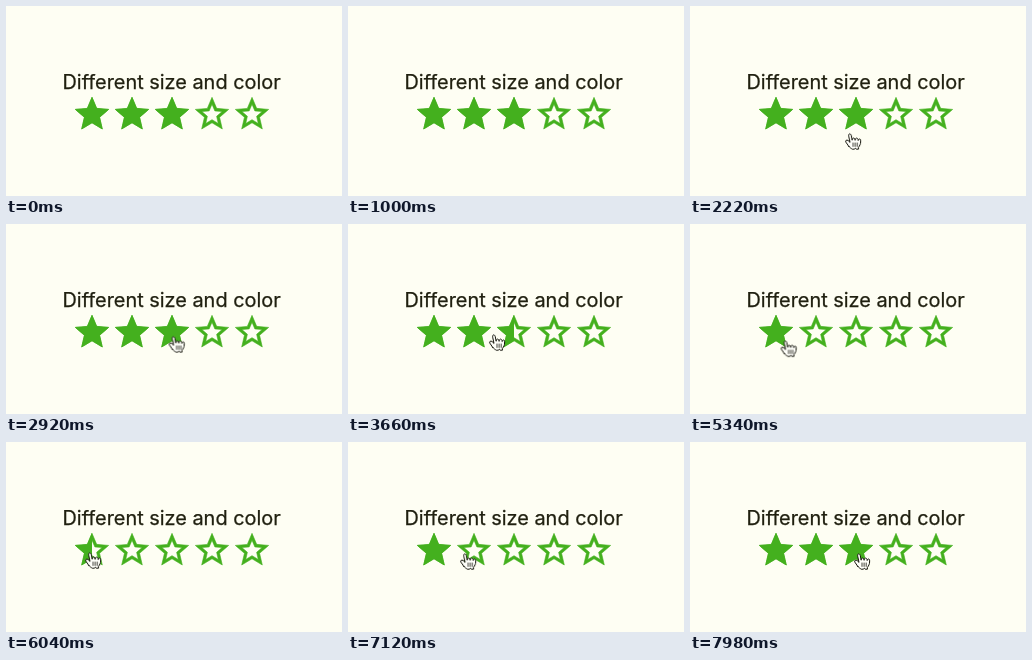
These frames come from a looping animation (336x190 px, 8 s). An HTML page:

```html
<!DOCTYPE html>
<html lang="en">
<head>
<meta charset="utf-8">
<title>Star rating</title>
<style>
  html, body { margin: 0; width: 100%; height: 100%; overflow: hidden; background: #fefef3; }
  svg { position: absolute; left: 0; top: 0; width: 336px; height: 190px; overflow: hidden; }
  text { font: 400 19.9px Inter, "Open Sans", sans-serif; fill: #202010; stroke: #202010; stroke-width: .25; text-anchor: middle; }
  .stars { fill: #44b01e; stroke: #44b01e; stroke-width: .35; }

  .filled { animation: rating 8s step-end infinite; }
  .cursor { animation: drag 8s linear infinite; }

  /* Each half star is 20px; the row starts at x = 66. */
  @keyframes rating {
    0%     { clip-path: inset(0 150px 0 0); }
    43.5%  { clip-path: inset(0 170px 0 0); }
    46.5%  { clip-path: inset(0 190px 0 0); }
    54%    { clip-path: inset(0 210px 0 0); }
    62%    { clip-path: inset(0 230px 0 0); }
    70.5%  { clip-path: inset(0 250px 0 0); }
    79.5%  { clip-path: inset(0 230px 0 0); }
    89.5%  { clip-path: inset(0 210px 0 0); }
    92.5%  { clip-path: inset(0 190px 0 0); }
    95%    { clip-path: inset(0 170px 0 0); }
    97.5%, 100% { clip-path: inset(0 150px 0 0); }
  }

  @keyframes drag {
    0%, 23.5% { transform: translate(150px, 192px); animation-timing-function: ease-out; }
    27.75% { transform: translate(155px, 127px); }
    31%    { transform: translate(162px, 113px); }
    40.5%  { transform: translate(163px, 111px); animation-timing-function: ease-in; }
    45.75% { transform: translate(141px, 110px); }
    50.5%  { transform: translate(129px, 116px); }
    58%    { transform: translate(114px, 113px); }
    61%    { transform: translate(104px, 120px); }
    70%    { transform: translate(83px, 114px); animation-timing-function: ease-out; }
    75.5%  { transform: translate(79px, 110px); }
    78.5%  { transform: translate(82px, 111px); }
    89%    { transform: translate(112px, 111px); }
    97.5%  { transform: translate(161px, 111px); }
    99.75%, 100% { transform: translate(164px, 111px); }
  }
</style>
</head>
<body>
<svg viewBox="0 0 336 190">
  <defs>
    <path id="solid" d="M12 17.27L18.18 21l-1.64-7.03L22 9.24l-7.19-.61L12 2 9.19 8.63 2 9.24l5.46 4.73L5.82 21z"/>
    <path id="outline" d="M22 9.24l-7.19-.62L12 2 9.19 8.63 2 9.24l5.46 4.73L5.82 21 12 17.27 18.18 21l-1.63-7.03zM12 15.4l-3.76 2.27 1-4.28-3.32-2.88 4.38-.38L12 6.1l1.71 4.04 4.38.38-3.32 2.88 1 4.28z"/>
  </defs>
  <text x="165.6" y="83">Different size and color</text>
  <g class="stars" transform="translate(66 88) scale(1.66667)">
    <use href="#outline"/>
    <use href="#outline" x="24"/>
    <use href="#outline" x="48"/>
    <use href="#outline" x="72"/>
    <use href="#outline" x="96"/>
  </g>
</svg>
<svg class="filled" viewBox="0 0 336 190">
  <g class="stars" transform="translate(66 88) scale(1.66667)">
    <use href="#solid"/>
    <use href="#solid" x="24"/>
    <use href="#solid" x="48"/>
  </g>
</svg>
<svg viewBox="0 0 336 190">
  <g class="cursor" stroke="#111108" stroke-linejoin="round" stroke-linecap="round">
    <path fill="#fffffa" d="M3.7 13.3L.9 9.2C0 7.6 1.6 6.4 3.1 7.5L5 9.4 3.7 3.2C3.2.4 5.4.1 6.2 2.3L7.2 7.2C7 4.5 9.9 4.1 10.1 7.3 10.1 4.4 13 4.2 13.2 7.5 13.5 5.5 15.5 5.6 15.6 7.2V9C15.6 11 14.7 12.7 13.4 14.5V16.2H11.2L10.4 15.2 9.2 16.2H7.2C6.4 15.5 4.8 14.8 3.7 13.3Z"/>
    <path fill="none" stroke-width=".8" d="M8 10v3.4M10.1 10v3.4M12.2 10v3.4"/>
  </g>
</svg>
</body>
</html>
```
